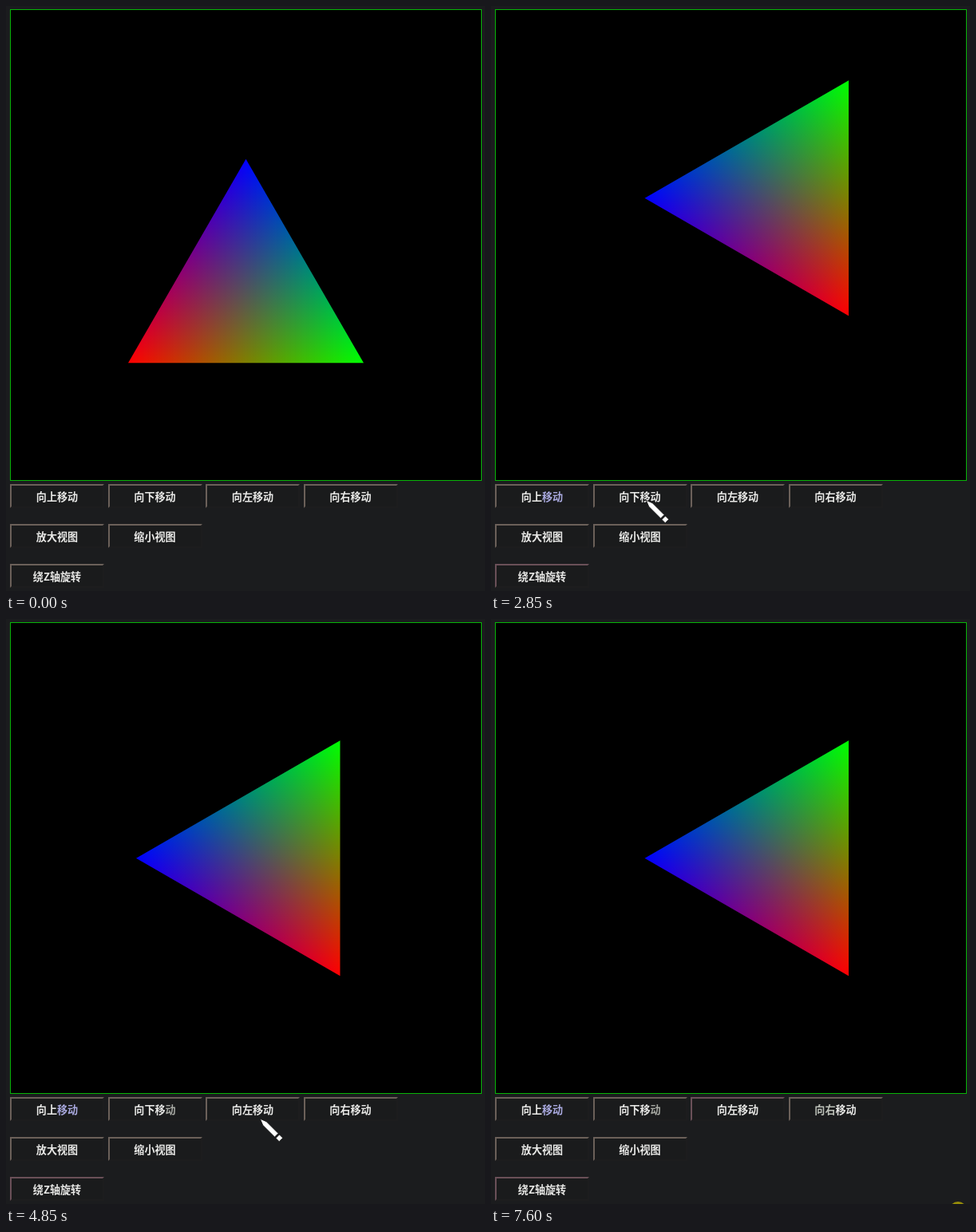
These frames come from a looping animation (600 by 733 pixels, 7.62 s). An HTML page with a canvas:

```html
<!DOCTYPE html>
<html lang="zh-CN">
<head>
<meta charset="utf-8">
<title>三角形变换</title>
<style>
html, body { margin: 0; width: 100%; height: 100%; overflow: hidden; background: #1b1c1e; }
#stage { position: absolute; left: 0; top: 0; width: 600px; height: 733px; overflow: hidden; }
canvas, svg { position: absolute; left: 0; top: 0; }
.btn {
  position: absolute; box-sizing: border-box; width: 118px; height: 30px;
  border: 2px solid; border-color: #6b6059 #1d1d1e #1d1d1e #6b6059;
  background: #1a1b1c; color: #e8e8e6;
  font: bold 13.1px/28px "Noto Sans CJK SC", "Noto Sans CJK", sans-serif;
  text-align: center; white-space: nowrap;
}
</style>
</head>
<body>
<div id="stage">
  <canvas id="view" width="600" height="598"></canvas>
  <svg id="overlay" width="600" height="733">
    <circle id="halo" cx="585" cy="741" r="11" fill="#968c0a"/>
    <g id="pen" fill="#fff" stroke="#111" stroke-width=".8">
      <path transform="rotate(45)" d="M-1 0L7 -3.2H28V3.2H7ZM30 -3.2H36V3.2H30Z"/>
    </g>
  </svg>
</div>
<script>
const LOOP = 7620, STEP = 29.5, HALF = 147.5;
const stage = document.getElementById('stage');
const overlay = document.getElementById('overlay');
const halo = document.getElementById('halo');
const pen = document.getElementById('pen');
const ctx = document.getElementById('view').getContext('2d');

// Bars enclose the part of a label that can change ink
const rows = [
  ['向上|移动', '向下移|动', '向左移动', '|向右|移动'],
  ['放大视图', '缩小视图'],
  ['绕Z轴旋转']
];
const [[up, down, left, right], , [spin]] =
  rows.map((labels, row) => labels.map((label, col) => {
    const el = document.createElement('div');
    el.className = 'btn';
    el.style.left = 5 + col * 122.5 + 'px';
    el.style.top = 599 + row * 50.2 + 'px';
    const spans = label.split('|').map(text => {
      const span = document.createElement('span');
      span.textContent = text;
      el.append(span);
      return span;
    });
    stage.insertBefore(el, overlay);
    return { el, mark: spans[1] };
  }));

// Where the pen rests, when it gets there, and what its clicks do
const stops = [
  { x: 606, y: 735, arrive: -100 },
  { x: 45, y: 712, arrive: 770, lift: 50, button: spin, clicks: [870], turn: 1, edge: '#6a5058' },
  { x: 88, y: 618, arrive: 1800, button: up, clicks: [2020, 2280], dy: -1, ink: '#a9a9df' },
  { x: 195, y: 620, arrive: 2810, button: down, clicks: [3330, 3600], dy: 1, ink: '#a8aaa4' },
  { x: 319, y: 627, arrive: 3990, button: left, clicks: [4500, 4970], dx: -1, edge: '#6a5058' },
  { x: 415, y: 617, arrive: 5500, button: right, clicks: [5900, 6150], dx: 1, ink: '#bcc0b8' },
  { x: 606, y: 703, arrive: 7290 },
  { x: 578, y: 744, arrive: 7600 }
];
for (const s of stops) s.leave = (s.clicks ? s.clicks.at(-1) : s.arrive) + 100;

function tipAt(t) {
  const next = stops.findIndex(s => s.arrive > t);
  if (next < 0) return stops.at(-1);
  const a = stops[next - 1], b = stops[next];
  const u = Math.max(0, (t - a.leave) / (b.arrive - a.leave));
  const k = u * u * (3 - 2 * u);
  return {
    x: a.x + (b.x - a.x) * k,
    y: a.y + (b.y - a.y) * k - 4 * (b.lift || 0) * k * (1 - k)
  };
}

function drawTriangle(dx, dy, turns) {
  const points = [[0, HALF * (1 - Math.sqrt(3))], [-HALF, HALF], [HALF, HALF]];
  const colors = ['#00f', '#f00', '#0f0'];
  ctx.save();
  ctx.translate(300.5 + dx * STEP, 299.75 + dy * STEP);
  ctx.rotate(-turns * Math.PI / 2);
  ctx.globalCompositeOperation = 'lighter';
  ctx.beginPath();
  points.forEach(p => ctx.lineTo(...p));
  ctx.closePath();
  // Each corner's light falls to black at the opposite edge
  points.forEach((p, i) => {
    const a = points[(i + 1) % 3], b = points[(i + 2) % 3];
    const g = ctx.createLinearGradient(...p, (a[0] + b[0]) / 2, (a[1] + b[1]) / 2);
    g.addColorStop(0, colors[i]);
    g.addColorStop(1, '#000');
    ctx.fillStyle = g;
    ctx.fill();
  });
  ctx.restore();
}

function drawView(t) {
  const pose = { dx: 0, dy: 0, turn: 0 };
  for (const s of stops) {
    const count = (s.clicks || []).filter(c => c <= t).length;
    for (const key in pose) pose[key] += count * (s[key] || 0);
  }
  ctx.clearRect(0, 0, 600, 598);
  ctx.fillStyle = '#000';
  ctx.fillRect(5, 4, 591, 591);
  drawTriangle(pose.dx, pose.dy, pose.turn);
  ctx.strokeStyle = '#08b408';
  ctx.strokeRect(5.5, 4.5, 590, 590);
}

function tintButtons(t) {
  for (const { button, clicks, ink, edge } of stops) {
    if (!button) continue;
    const used = t >= clicks.at(-1);
    if (ink) button.mark.style.color = used ? ink : '';
    if (edge) button.el.style.borderLeftColor = button.el.style.borderTopColor = used ? edge : '';
  }
}

const start = performance.now();
function frame() {
  const t = (performance.now() - start) % LOOP;
  drawView(t);
  tintButtons(t);
  const { x, y } = tipAt(t);
  pen.setAttribute('transform', `translate(${x.toFixed(1)} ${y.toFixed(1)})`);
  halo.style.visibility = t >= 7550 ? 'visible' : 'hidden';
  requestAnimationFrame(frame);
}
frame();
</script>
</body>
</html>
```
